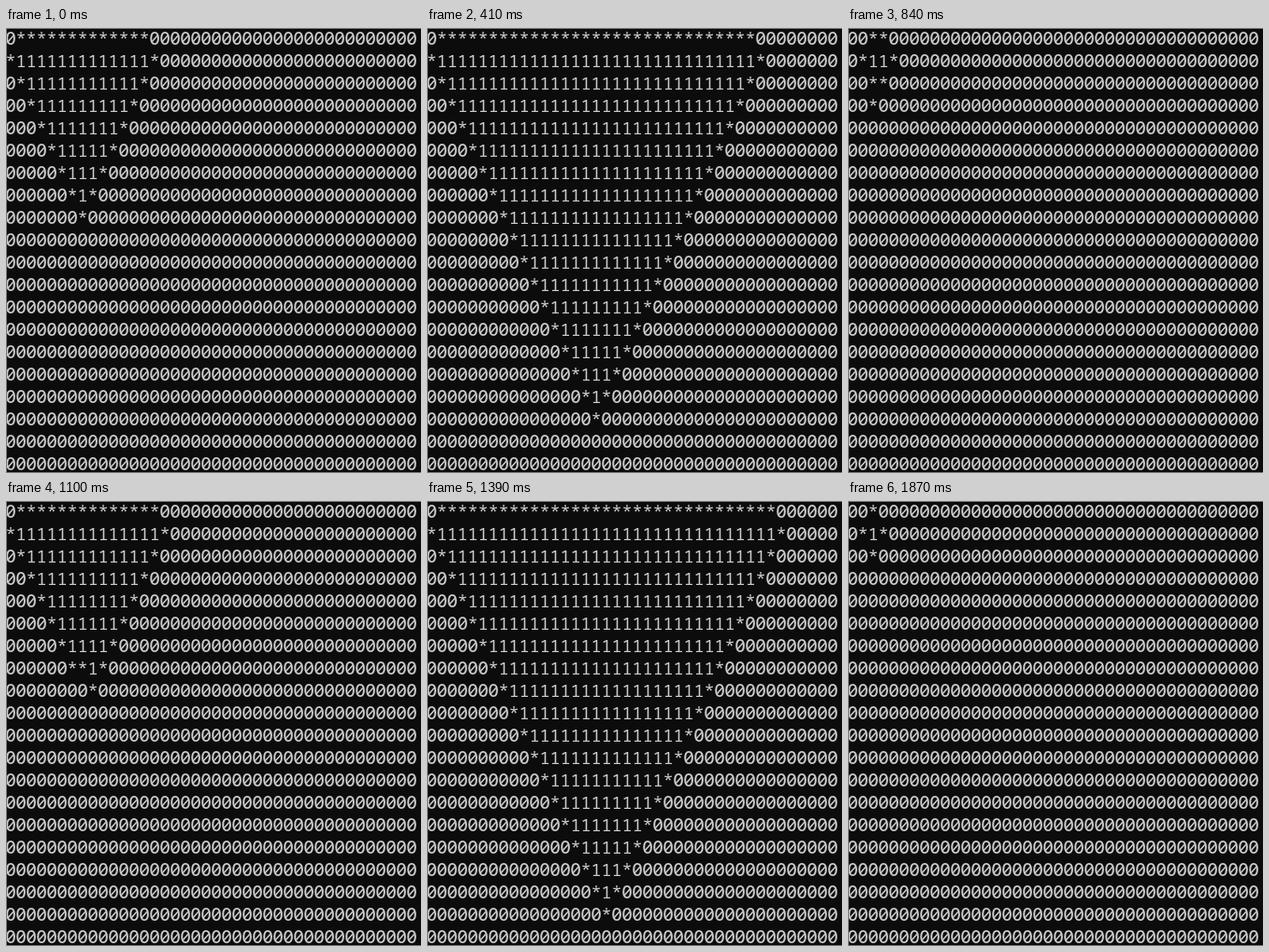
Animation, 444 px wide and 477 px high, one loop 1970 ms. Source, as an HTML page with a canvas:

```html
<!DOCTYPE html>
<html lang="en">
<head>
<meta charset="utf-8">
<title>Pulsing text diamond</title>
<style>
  html, body { margin: 0; width: 100%; height: 100%; overflow: hidden; background: #0c0c0c; }
  canvas { display: block; }
</style>
</head>
<body>
<canvas id="stage" width="444" height="477"></canvas>
<script>
const COLS = 40, ROWS = 20, CELL_W = 11, CELL_H = 24, TICK = 30, LOOP = 1970;
const FONTS = {
  '0': '500 18px Inter, sans-serif',
  '1': '500 18.33px "Noto Sans Mono", monospace',
  '*': '18.33px "Noto Sans Mono", monospace'
};
const ctx = document.getElementById('stage').getContext('2d', { alpha: false });

// Pulse phase in radians at given times in ms; flat stretches are pauses.
const PHASES = [
  [0, -1.843], [210, -0.542], [480, 1.066], [579, 1.066], [580, 1.12], [640, 1.464],
  [1100, 4.492], [1390, 6.283], [1560, 7.384], [1580, 7.505], [1640, 7.87],
  [1870, 9.3], [LOOP, 9.3]
];

function phaseAt(time) {
  const i = PHASES.findIndex(([end]) => time < end);
  const [t0, p0] = PHASES[i - 1], [t1, p1] = PHASES[i];
  const stepped = Math.floor((time - t0) / TICK) * TICK;
  return p0 + (p1 - p0) * stepped / (t1 - t0);
}

// Points that leave the grid are pressed against its edge.
function plot(grid, x, y, char) {
  const col = Math.min(COLS - 1, Math.max(0, x));
  const row = Math.min(ROWS - 1, Math.max(0, y));
  grid[row][col] = char;
}

// The bias decides where a nearly diagonal line takes its flat step.
function line(grid, x0, y0, x1, y1, bias) {
  const dx = Math.abs(x1 - x0), dy = Math.abs(y1 - y0), steps = Math.max(dx, dy);
  for (let i = 0; i <= steps; i++) {
    const x = x0 + Math.sign(x1 - x0) * Math.floor(i * dx / steps + bias);
    const y = y0 + Math.sign(y1 - y0) * Math.floor(i * dy / steps + bias);
    plot(grid, x, y, '*');
  }
}

function diamond(radius) {
  const grid = Array.from({ length: ROWS }, () => Array(COLS).fill('0'));
  const cx = radius + 0.4 + 0.25 / radius, cy = 0.8;
  const left = Math.round(cx - radius), right = Math.round(cx + radius);
  const top = Math.round(cy - radius), bottom = Math.round(cy + radius);
  const midX = Math.round(cx), midY = Math.round(cy);

  line(grid, left, midY, midX, top, 0.5);
  line(grid, right, midY, midX, top, 0.5);
  line(grid, left, midY, midX, bottom, 0.86);
  line(grid, right, midY, midX, bottom, 0.4);

  for (const row of grid) {
    const first = row.indexOf('*'), last = row.lastIndexOf('*');
    for (let x = first + 1; x < last; x++) if (row[x] === '0') row[x] = '1';
  }
  return grid;
}

// Draws every cell holding this character; zeros get a slash.
function drawChars(grid, char) {
  ctx.font = FONTS[char];
  ctx.beginPath();
  grid.forEach((row, y) => row.forEach((cell, x) => {
    if (cell !== char) return;
    const cx = x * CELL_W + 5, base = y * CELL_H + 18;
    ctx.fillText(char, cx, base);
    if (char === '0') {
      ctx.moveTo(cx - 2.8, base - 3.2);
      ctx.lineTo(cx + 2.8, base - 9.8);
    }
  }));
  ctx.stroke();
}

function draw(grid) {
  ctx.fillStyle = '#0c0c0c';
  ctx.fillRect(0, 0, 444, 477);
  ctx.textAlign = 'center';
  ctx.fillStyle = ctx.strokeStyle = '#ccc';
  ctx.lineWidth = 1.5;
  for (const char in FONTS) drawChars(grid, char);
  ctx.fillStyle = '#767676';
  ctx.fillRect(0, 0, 444, 1);
  ctx.fillRect(0, 476, 444, 1);
  ctx.fillRect(0, 0, 1, 477);
}

const start = performance.now();
function frame() {
  const time = (performance.now() - start) % LOOP;
  draw(diamond(9 + 8 * Math.cos(phaseAt(time))));
  requestAnimationFrame(frame);
}
frame();
</script>
</body>
</html>
```
